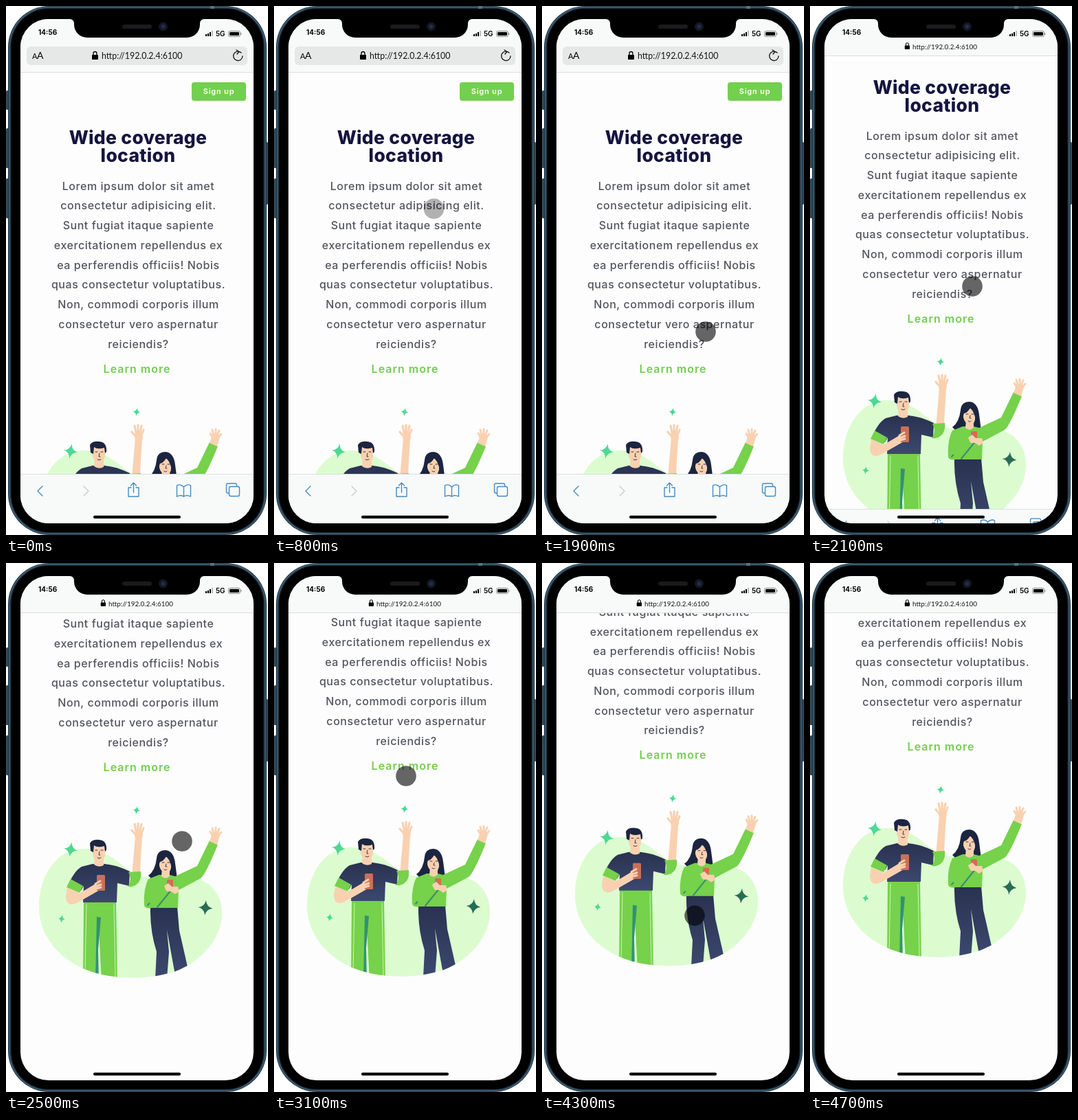
An HTML page that plays this animation: 381 by 770 pixels, repeating every 5900 ms.

```html
<!DOCTYPE html>
<html lang="en">
<head>
<meta charset="utf-8">
<title>Phone page demo</title>
<style>
  html, body { margin: 0; width: 100%; height: 100%; overflow: hidden; background: #fff; }
  svg { display: block; width: 100%; height: 100%; }
  text { font-family: Inter, sans-serif; }
  .line { fill: none; stroke-linecap: round; stroke-linejoin: round; }
  .copy { font-size: 16px; font-weight: 500; letter-spacing: .55px; fill: #53555e; text-anchor: middle; }
  .title { font-size: 26.5px; font-weight: 800; letter-spacing: .3px; fill: #14153f; text-anchor: middle; }
  .link { font-size: 16px; font-weight: 600; letter-spacing: 1px; fill: #73cd4e; text-anchor: middle; }
  .sign { font-size: 11px; font-weight: 600; letter-spacing: .8px; fill: #fff; text-anchor: middle; }
  .lato { font-family: Lato, sans-serif; }
  .skin { fill: #f9d1b0; } .navy { fill: url(#cloth); } .green { fill: #76d14b; } .hair { fill: #1c2540; }
  .arm { stroke: #f9d1b0; }
</style>
</head>
<body>
<svg viewBox="0 0 381 770">
  <defs>
    <clipPath id="screen"><rect x="21" y="19" width="339" height="734" rx="41"/></clipPath>
    <linearGradient id="cloth" x2="0" y2="1">
      <stop stop-color="#29324f"/><stop offset="1" stop-color="#3c4870"/>
    </linearGradient>
    <path id="star" d="M0-1Q.14-.14 1 0Q.14.14 0 1Q-.14.14-1 0Q-.14-.14 0-1Z"/>
    <path id="blob" d="M48 503C47 455 74 417 110 416C151 415 164 441 193 455C226 464 265 447 294 467C311 480 315 499 314 514C311 556 271 590 233 598C198 607 150 606 114 591C70 572 49 537 48 503Z"/>
    <clipPath id="ground"><path d="M40 360H330V514C311 556 271 590 233 598C198 607 150 606 114 591C70 572 49 537 40 503Z"/></clipPath>
  </defs>

  <!-- phone body -->
  <g fill="#304a59">
    <rect y="123" width="6" height="28" rx="1.5"/><rect y="178" width="6" height="58" rx="1.5"/>
    <rect y="251" width="6" height="58" rx="1.5"/><rect x="376" y="198" width="5" height="91" rx="1.5"/>
  </g>
  <rect x="3" width="376" height="770" rx="60" fill="#1d3341"/>
  <rect x="5" y="1.7" width="372" height="766.6" rx="58" fill="none" stroke="#47657a" stroke-width="1.4"/>
  <rect x="7.5" y="4" width="367" height="762" rx="55"/>
  <path d="M297 0h6v4h-6z" fill="#5b7180"/>

  <g clip-path="url(#screen)">
    <path d="M21 19h339v734H21z" fill="#fdfdfd"/>
    <g id="page">
      <rect id="button" x="270" y="111" width="79" height="27" rx="4"/>
      <text class="sign" x="309.5" y="128">Sign up</text>
      <text class="title" x="192" y="201">Wide coverage</text>
      <text class="title" x="192" y="227">location</text>
      <g id="copy"></g>
      <text class="link" x="190.5" y="533.5">Learn more</text>

      <g transform="translate(0 231)">
        <use href="#blob" fill="#dcfcd0"/>
        <g fill="#4ed893">
          <use href="#star" transform="translate(94 417) rotate(9) scale(10 11)"/>
          <use href="#star" transform="translate(190 360) rotate(9) scale(5.5 6)"/>
          <use href="#star" transform="translate(81 518) rotate(9) scale(5 6)"/>
          <use href="#star" transform="translate(290 502) rotate(5) scale(10.5 11)" fill="#286c56"/>
        </g>

        <!-- man -->
        <g clip-path="url(#ground)">
          <path class="green" d="M113 492H160L162 610H139L134 515L131 610H112Z"/>
          <path d="M132 515L138 516L134 563L135 610H130Z" fill="#329174"/>
          <path class="line" d="M117 497L115 600M157 497L159 602" stroke="#c9f5b5"/>
        </g>
        <path class="skin" d="M183 456L188 398L198 398L194 467Z"/>
        <path class="line arm" stroke-width="3.2" d="M189 396L183 389M190 394L187 380M192 394L192 379M194 394L197 380M196 396L200 386"/>
        <ellipse class="skin" cx="193" cy="396" rx="6" ry="7"/>
        <path class="navy" d="M126 438L110 442C101 447 94 460 91 468L109 477L113 470L112 494H161L162 466L179 470L180 449C173 446 163 440 143 438Z"/>
        <path class="green" d="M178 450L196 449C198 463 189 473 177 471C182 464 182 457 178 450ZM94 460L112 470L107 480L88 472Z"/>
        <path class="skin" d="M89 473L106 480L105 482L130 467L138 469L138 475L103 495C92 500 87 495 87 485Z"/>
        <rect x="132" y="454" width="12" height="23" rx="1.5" fill="#c9705a"/>
        <path class="line arm" stroke-width="3" d="M130 467L137 463M130 471L138 468M131 474L138 472"/>
        <path class="skin" d="M129 425H142V440Q135 444 128 439Z"/>
        <path class="skin" d="M126 411H144V424Q143 434 136 435Q128 434 126 424Z"/>
        <path class="hair" d="M123 419L122 408Q125 402 136 403Q147 404 146 418L144 420L143 412Q133 415 128 411L127 421Z"/>
        <path class="line" stroke="#39354a" stroke-width="1" d="M130 418h3M138 418h3M136 420L135 425h2M133 429q3 2 5 0"/>

        <!-- woman -->
        <path class="hair" d="M219 430Q220 418 232 418Q244 419 246 437L249 460L217 465L207 455Q217 448 219 430Z"/>
        <g clip-path="url(#ground)">
          <path class="navy" d="M210 500H249L252 535L265 592L246 600L234 534L237 566L234 605H217L219 566Q209 535 210 500Z"/>
        </g>
        <path class="green" d="M222 454L207 460C202 469 200 485 201 499Q204 504 212 502H250L251 476L283 459Q290 454 308 410L296 404L278 441L246 456L238 454Z"/>
        <path class="line" stroke="#398e69" stroke-width="2" d="M220 501L241 475M206 498L217 486"/>
        <path class="skin" d="M296 405L301 391L312 394L307 410Z"/>
        <path class="line arm" stroke-width="3" d="M301 398L297 391M302 394L300 386M305 394L305 385M307 394L310 387M308 397L313 392"/>
        <path class="skin" d="M227 445H238V455Q233 462 226 456Z"/>
        <path class="skin" d="M223 431Q231 424 240 431V444Q238 452 233 452Q225 450 223 441Z"/>
        <path class="hair" d="M221 443L222 427Q233 417 242 430L243 449L239 437Q237 431 233 427Q229 434 224 435Z"/>
        <path class="line" stroke="#39354a" stroke-width="1" d="M227 436h3M235 436h3M233 438L232 442h2M230 446q3 2 4 0"/>
        <rect x="234" y="461" width="9" height="17" rx="1.5" fill="#d66b55"/>
        <path class="skin" d="M230 470L236 466L241 471L250 471L252 478L246 482L240 478L233 478Z"/>
        <path class="green" d="M204 491L230 473L235 479L214 499Z"/>
      </g>
    </g>

    <!-- browser chrome -->
    <path id="header" d="M21-20h339V96H21z" fill="#f8faf9"/>
    <path id="rule" d="M21 96.5h339" stroke="#dcdddd"/>
    <g id="field">
      <rect x="30" y="59" width="321" height="27" rx="6" fill="#e6e8e7"/>
      <text class="lato" x="38" y="77" font-size="11">A</text><text class="lato" x="45" y="77" font-size="14">A</text>
      <path class="line" d="M342 68A6.7 6.7 0 1 0 344 73M335 64L339 66.5L336 70" stroke="#111" stroke-width="1.3"/>
    </g>
    <g id="address">
      <rect x="-69" y="-2" width="9" height="7" rx="1"/>
      <path class="line" d="M-67-2v-2a2.5 2.5 0 0 1 5 0v2" stroke="#000" stroke-width="1.3"/>
      <text class="lato" x="-55" y="4.4" font-size="12.4" fill="#161616">http://192.0.2.4:6100</text>
    </g>
    <text x="47" y="42" font-size="10" font-weight="700">14:56</text>
    <path d="M290 41h2v3h-2zM293 40h2v4h-2zM296 38h2v6h-2z"/><path d="M299 36h2v8h-2z" fill="#bbb"/>
    <text x="305" y="43.5" font-size="10" font-weight="600">5G</text>
    <rect x="323.5" y="36.5" width="17" height="8" rx="2" fill="none" stroke="#888"/>
    <rect x="325" y="38" width="14" height="5" rx="1"/><path d="M341.5 39h1v3h-1z" fill="#888"/>

    <g id="toolbar" class="line" stroke="#438ac4" stroke-width="1.4">
      <path d="M21 681.5h339v90H21z" fill="#f8faf9" stroke="#dcdddd" stroke-width="1"/>
      <path d="M53 699L46 706L53 713"/>
      <path d="M113 699L120 706L113 713" stroke="#c8cbcc"/>
      <path d="M182 701h-4v13h15v-13h-4M185.5 708V694M181.5 698L185.5 694L189.5 698"/>
      <path d="M258.5 700Q253 695 248.5 698V714Q254 711 258.5 714Q263 711 268.5 714V698Q264 695 258.5 700V714"/>
      <rect x="324.5" y="699.5" width="15" height="14" rx="2.5"/>
      <path d="M324 709h-1.5q-2 0-2-2v-10q0-2 2-2h11q2 0 2 2v2"/>
    </g>
    <rect x="127" y="741.7" width="127" height="4.3" rx="2.1"/>
    <circle id="touch"/>
  </g>

  <!-- notch -->
  <path d="M93 18H288V19A6 6 0 0 0 282 25V27A19 19 0 0 1 263 46H118A19 19 0 0 1 99 27V25A6 6 0 0 0 93 19Z"/>
  <rect x="169" y="27" width="43" height="6" rx="3" fill="#1b1b1d"/>
  <circle cx="228.5" cy="30" r="6.5" fill="#15171f"/><circle cx="228.5" cy="30" r="3" fill="#222c55"/>
</svg>
<script>
const $ = id => document.getElementById(id);
const LOOP = 5900, STEP = 100;

const copy = ['Lorem ipsum dolor sit amet', 'consectetur adipisicing elit.', 'Sunt fugiat itaque sapiente',
  'exercitationem repellendus ex', 'ea perferendis officiis! Nobis', 'quas consectetur voluptatibus.',
  'Non, commodi corporis illum', 'consectetur vero aspernatur', 'reiciendis?'];
$('copy').innerHTML = copy.map((line, i) =>
  `<text class="copy" x="192.5" y="${267.6 + i * 28.75}">${line}</text>`).join('');

// Each key is [time, ...values].
const scrollKeys = [[1900, 0], [2000, 25], [2100, 73], [2200, 73], [2300, 160], [2400, 212], [2500, 231],
  [2600, 233], [4100, 233], [4400, 256], [4700, 261]];
const touchKeys = [[700, 225, 320, 0], [900, 240, 270, 1], [1200, 287, 138, 1], [1300, 290, 124, 1], [1400, 290, 124, 1],
  [1900, 238, 474, 1], [2100, 236, 408, 1], [2200, 236, 408, 1], [2500, 256, 405, 1], [2800, 252, 395, 1],
  [3100, 192, 310, 1], [3300, 190, 300, 1], [3500, 190, 300, 1], [4000, 222, 530, 1], [4100, 222, 530, 1],
  [4400, 222, 505, 1], [4700, 222, 500, 0]];

function sample(keys, t) {
  const next = keys.findIndex(key => key[0] > t);
  if (next === 0) return keys[0].slice(1);
  if (next < 0) return keys.at(-1).slice(1);
  const a = keys[next - 1], b = keys[next];
  const k = (t - a[0]) / (b[0] - a[0]);
  return a.slice(1).map((v, i) => v + (b[i + 1] - v) * k);
}

function set(id, attributes) {
  for (const name in attributes) $(id).setAttribute(name, attributes[name]);
}

function draw(t) {
  const [scroll] = sample(scrollKeys, t);
  const [x, y, opacity] = sample(touchKeys, t);
  const fold = Math.min(1, scroll / 73);
  const pressed = t === 1300 || t === 4000 || t === 4100;
  const lift = `translate(0 ${-24 * fold})`;

  set('page', { transform: `translate(0 ${-scroll})` });
  set('button', { fill: t >= 1300 && t < 1600 ? '#15164a' : '#73d04d' });
  set('header', { transform: lift });
  set('rule', { transform: lift });
  set('field', { transform: lift, opacity: 1 - fold });
  set('address', { transform: `translate(${194 - fold} ${73 - 14 * fold}) scale(${1 - .2 * fold})` });
  set('toolbar', { transform: `translate(0 ${Math.min(90, scroll * .7)})` });
  set('touch', {
    cx: x, cy: y, opacity, r: pressed ? 15.5 : 14.8,
    fill: `rgba(0,0,0,${pressed ? .7 : .6})`,
    stroke: pressed ? '#949795' : 'none', 'stroke-width': 2.4
  });
}

const start = performance.now();
function tick() {
  const t = (performance.now() - start) % LOOP;
  draw(Math.floor(t / STEP) * STEP);
  requestAnimationFrame(tick);
}
tick();
</script>
</body>
</html>
```
